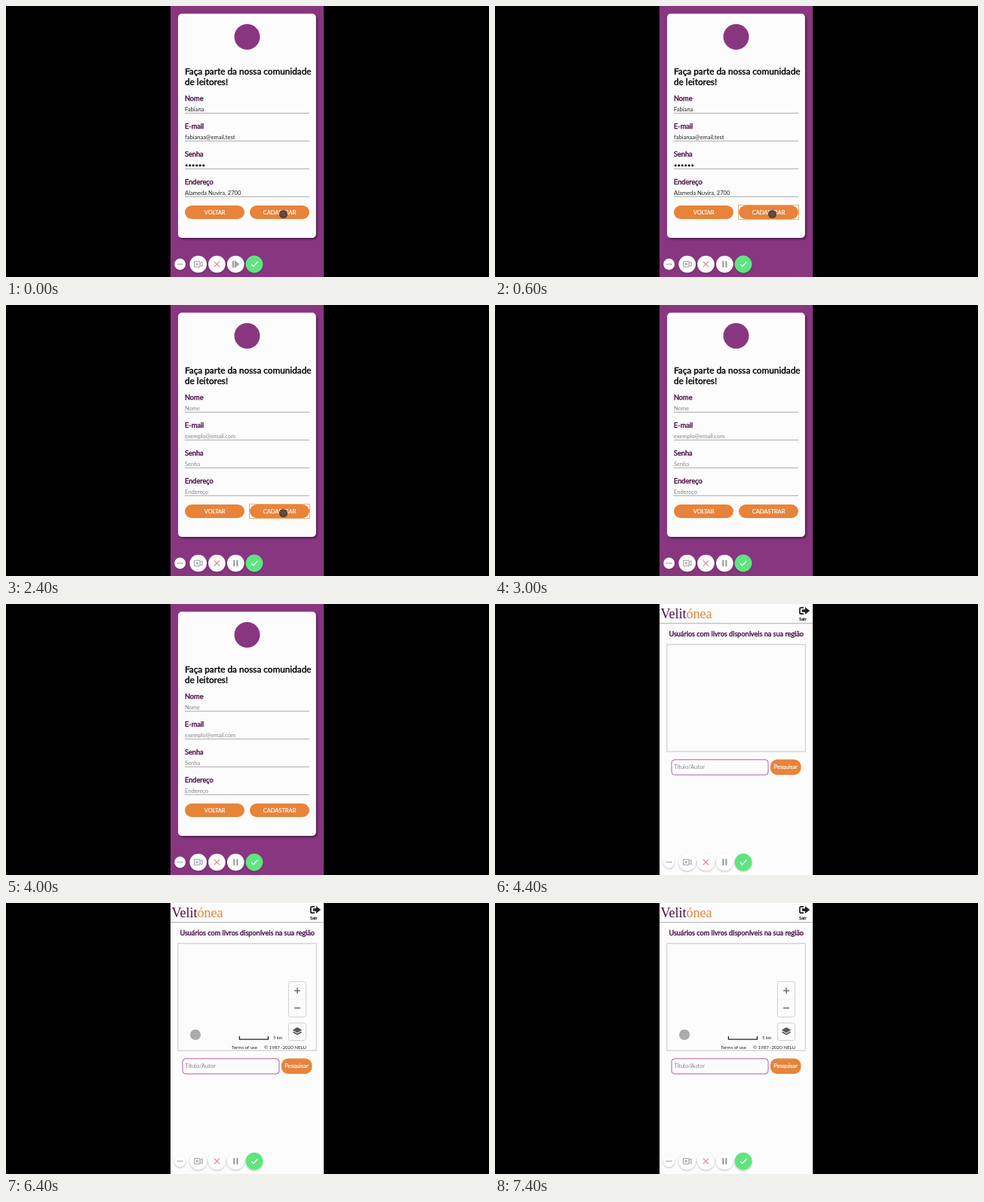
Animation, 640 px wide and 360 px high, one loop 8 s. Source, as an HTML page:

```html
<!DOCTYPE html>
<html lang="pt">
<head>
<meta charset="utf-8">
<title>Cadastro de leitores</title>
<style>
  html, body { margin: 0; width: 100%; height: 100%; overflow: hidden; background: #000; }
  svg { display: block; width: 640px; height: 360px; font-family: Lato, sans-serif; }
  .bold { paint-order: stroke; stroke-width: .4px; }
  .label { font-size: 9.2px; fill: #4b1046; stroke: #4b1046; }
  .value { font-size: 7.6px; fill: #222; }
  .hint { font-size: 7.5px; fill: #858585; }
  .button { font-size: 7.5px; fill: #fff; stroke: #fff; stroke-width: .2px; text-anchor: middle; }
  .small { font-size: 6.15px; fill: #222; }
</style>
</head>
<body>
<svg viewBox="0 0 640 360">
  <defs>
    <filter id="cardShadow" x="-10%" y="-10%" width="120%" height="120%">
      <feDropShadow dx="2" dy="2" stdDeviation="1.3" flood-color="#2b0929" flood-opacity=".65"/>
    </filter>
    <filter id="softShadow" x="-30%" y="-30%" width="160%" height="170%">
      <feDropShadow dx="0" dy="1" stdDeviation="1.3" flood-opacity=".3"/>
    </filter>
  </defs>
  <rect width="640" height="360"/>

  <g id="signup">
    <rect x="218" width="203" height="360" fill="#893681"/>
    <rect x="228" y="10.3" width="182.7" height="297.7" rx="5" fill="#fdfcfc" filter="url(#cardShadow)"/>
    <circle cx="319.5" cy="41" r="17" fill="#893681"/>
    <g class="bold" font-size="11.8" stroke="#000">
      <text x="237" y="91.4">Faça parte da nossa comunidade</text>
      <text x="237" y="105.3">de leitores!</text>
    </g>
    <g id="labels"></g>
    <g id="values"></g>
    <g id="hints"></g>
    <rect x="237" y="265" width="79" height="18" rx="9" fill="#e8833a"/>
    <rect x="323" y="265" width="79" height="18" rx="9" fill="#e8833a"/>
    <text class="button" x="276.7" y="276.8">VOLTAR</text>
    <text class="button" x="362.5" y="276.8">CADASTRAR</text>
    <rect id="ring" x="322.5" y="264.5" width="80" height="19" fill="none" stroke="#eda75f" stroke-width=".9"/>
    <g id="touch">
      <circle cx="367.5" cy="276.5" r="5.6" fill="#4b3a35" opacity=".9"/>
      <circle cx="367.5" cy="276.5" r="3" fill="#675248" opacity=".7"/>
    </g>
  </g>

  <g id="home">
    <rect x="218" width="203" height="360" fill="#fdfcfc"/>
    <text x="219.5" y="19" font-family="'Liberation Serif', serif" font-size="18" fill="#461041">Velit<tspan fill="#e8833a">ónea</tspan></text>
    <path d="M409 4.8h-3.2q-2 0-2 2v4.4q0 2 2 2h3.2" fill="none" stroke="#222" stroke-width="1.8"/>
    <path d="M406.8 7.3h4V4l6.3 5-6.3 5v-3.3h-4z" fill="#222"/>
    <text class="bold" x="407.8" y="21.7" font-size="5.8" fill="#222" stroke="#222" style="stroke-width:.25px" text-anchor="middle">Sair</text>
    <path d="M218 25.8h203" stroke="#aaa"/>
    <text class="label bold" x="319.7" y="43" style="font-size:9.1px" text-anchor="middle">Usuários com livros disponíveis na sua região</text>
    <rect x="227.8" y="53.8" width="183.4" height="142.2" fill="#fdfcfc" stroke="#c3c6c9"/>
    <rect x="234" y="206.8" width="128" height="20.2" rx="4" fill="#fdfcfc" stroke="#b25caf"/>
    <text class="hint" x="237.3" y="219.3">Título/Autor</text>
    <rect x="364.8" y="206.5" width="40.7" height="20.5" rx="9" fill="#e8833a"/>
    <text class="button" x="385" y="219.3">Pesquisar</text>

    <g id="mapControls">
      <circle cx="251" cy="175" r="7" fill="#aaabad"/>
      <path d="M309.4 177v4.2h38V177" fill="none" stroke="#222" stroke-width="1.3"/>
      <text class="small" x="354" y="181.3" style="font-size:5.6px">5 km</text>
      <text class="small" x="299" y="193.6">Terms of use</text>
      <text class="small" x="342" y="193.6">© 1987–2020 NELU</text>
      <g fill="#fdfcfc" stroke="#cfd1d4">
        <rect x="374.4" y="104.5" width="23.2" height="47" rx="3"/>
        <rect x="374.4" y="159.3" width="23.2" height="23.2" rx="3"/>
      </g>
      <path d="M375 128h22" stroke="#ececee" stroke-width=".7"/>
      <path d="M382 116.5h8m-4-4v8M382 139.5h8" stroke="#696d70" stroke-width="1.5"/>
      <path d="M386 165l6.3 3.7-6.3 3.7-6.3-3.7z" fill="#55595c"/>
      <path d="M379.7 171.7l1.8-1 4.5 2.7 4.5-2.7 1.8 1-6.3 3.9z" fill="#55595c"/>
    </g>
  </g>

  <g id="toolbar">
    <g fill="#fefefe" filter="url(#softShadow)">
      <circle cx="230.6" cy="343" r="7.4"/>
      <circle cx="254.7" cy="343" r="11.3"/>
      <circle cx="279.4" cy="343" r="11.3"/>
      <circle cx="304.3" cy="343" r="11.3"/>
      <circle cx="329" cy="343" r="11.4" fill="#5fe57f"/>
    </g>
    <path d="M228 343h.01m2.6 0h.01m2.6 0h.01" stroke="#666" stroke-width="1.6" stroke-linecap="round"/>
    <g fill="none" stroke="#909497" stroke-width=".9">
      <path d="M249.5 339.3h7.5v7.4h-7.5zM257 342l3-2.3v6.6l-3-2.3M251.2 343h4m-2-2v4"/>
      <path d="M275.8 339.4l7.2 7.2m0-7.2l-7.2 7.2" stroke="#e18291" stroke-width="1.2"/>
      <path d="M325 343.2l2.8 2.8 5.6-6" stroke="#fff" stroke-width="1.3"/>
    </g>
    <path id="pauseIcon" d="M302.3 338.8v8.4m4.1-8.4v8.4" stroke="#85898d" stroke-width="1.7"/>
    <g id="playIcon">
      <path d="M301 338.5v9" stroke="#85898d" stroke-width="1.7"/>
      <path d="M303.4 338.7l5.4 4.3-5.4 4.3z" fill="#a8acb0" stroke="#85898d" stroke-width=".8"/>
    </g>
  </g>
</svg>
<script>
  const LOOP = 8000;
  const $ = id => document.getElementById(id);

  const fields = [
    ['Nome', 'Fabiana', 'Nome'],
    ['E-mail', 'fabianaa@email.test', 'exemplo@email.com'],
    ['Senha', '', 'Senha'],
    ['Endereço', 'Alameda Nuvira, 2700', 'Endereço']
  ];
  const textTag = (style, y, content) => `<text class="${style}" x="237" y="${y}">${content}</text>`;

  fields.forEach(([label, value, hint], i) => {
    const y = 142.3 + i * 37;
    $('labels').innerHTML += textTag('label bold', y - 16, label) +
      `<path d="M237 ${y}h165" stroke="#aaa8aa"/>`;
    $('values').innerHTML += textTag('value', y - 2.4, value);
    $('hints').innerHTML += textTag('hint', y - 2.4, hint);
  });
  for (let i = 0; i < 6; i++) {
    $('values').innerHTML += `<circle cx="${239.2 + i * 4.5}" cy="211.8" r="1.55" fill="#111"/>`;
  }

  // Visibility window of each part, in ms.
  const schedule = {
    signup: [0, 4400],
    home: [4400, LOOP],
    values: [0, 2400],
    hints: [2400, 4400],
    ring: [470, 2530],
    touch: [0, 2530],
    playIcon: [0, 130],
    pauseIcon: [130, LOOP],
    mapControls: [6400, LOOP]
  };

  function render(time) {
    for (const [id, [from, to]] of Object.entries(schedule)) {
      $(id).style.display = time >= from && time < to ? '' : 'none';
    }
  }

  const start = performance.now();
  function tick() {
    render((performance.now() - start) % LOOP);
    requestAnimationFrame(tick);
  }
  tick();
</script>
</body>
</html>
```
